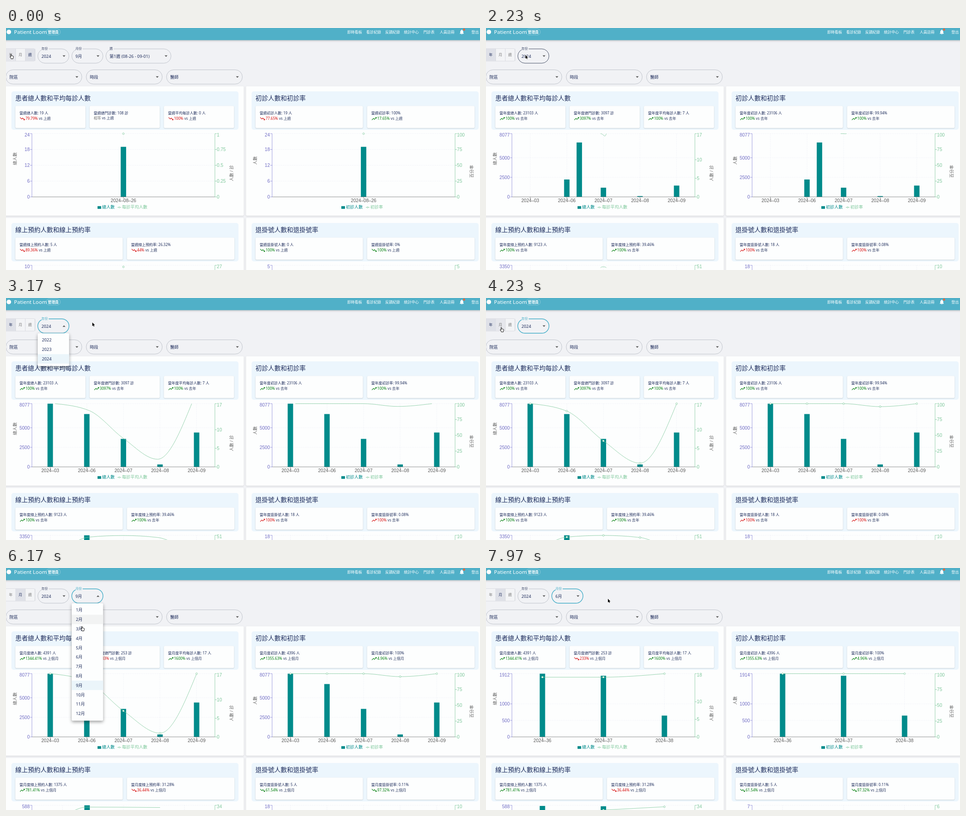
These frames come from a looping animation (1046 by 535 pixels, 8000 ms). An HTML page with a canvas:

```html
<!DOCTYPE html>
<html lang="zh-Hant">
<head>
<meta charset="utf-8">
<title>Clinic dashboard</title>
<style>
html, body { margin: 0; width: 100%; height: 100%; overflow: hidden; background: #f1f2f5; }
canvas { display: block; width: 1046px; height: 535px; }
</style>
</head>
<body>
<canvas id="stage"></canvas>
<script>
const W = 1046, H = 535, LOOP = 8000;
const canvas = document.getElementById('stage');
const g = canvas.getContext('2d');
const dpr = window.devicePixelRatio || 1;
canvas.width = W * dpr;
canvas.height = H * dpr;

const CJK = '"Noto Sans CJK TC", "Noto Sans CJK JP", "Noto Sans CJK", sans-serif';
const UI = '"Noto Sans", ' + CJK;
const AXIS = '"Liberation Sans", ' + CJK;
const BG = '#f1f2f5', NAVY = '#1f2d5c', TEAL = '#008b8b', GREEN = '#7cc79a', PURPLE = '#6f6bc4', FOCUS = '#45aec8';

// Times of clicks and of data arriving
const T = { year: 350, yearStats: 2130, yearMenu: [2420, 3450], month: 4480, monthMenu: [5450, 7020], monthStats: 6150 };

const PERIOD = { week: ['當週', '上週'], year: ['當年度', '去年'], month: ['當月度', '上個月'] };

// stats: [value, change in %]
const charts = [
  {
    x: 0, y: 0, title: '患者總人數和平均每診人數', labels: ['總人數', '總門診數', '平均每診人數'], units: [' 人', ' 診', ' 人'],
    stats: {
      week: [['19', -79.79], ['108', 0], ['0', -100]],
      year: [['23103', 100], ['3097', 3097], ['7', 100]],
      month: [['4391', 1344.41], ['253', -233], ['17', 1600]]
    },
    data: {
      week: { left: [0, 6, 12, 18, 24], right: [0, .25, .5, .75, 1], bars: [.792], line: [1] },
      year: { left: [0, 2500, 5000, 8077], right: [0, 5, 10, 17], bars: [1, .836, .443, .039, .5437], line: [1, 15 / 17, 7 / 17, 1 / 17, 1] },
      month: { left: [0, 500, 1000, 1912], right: [0, 5, 10, 18], bars: [1, .967, .337], line: [17 / 18, 17 / 18, 1] }
    },
    side: [['總人數', 20, 289], ['人數 / 診', 498, 321]], legend: [['總人數', 202], ['每診平均人數', 246]], arrive: [2145, 6225]
  },
  {
    x: 530, y: 0, title: '初診人數和初診率', labels: ['初診人數', '初診率'], units: [' 人', '%'],
    stats: {
      week: [['19', -77.65], ['100', 17.65]],
      year: [['23106', 100], ['99.94', 100]],
      month: [['4396', 1355.63], ['100', 4.96]]
    },
    data: {
      week: { left: [0, 6, 12, 18, 24], right: [0, 25, 50, 75, 100], bars: [.792], line: [1] },
      year: { left: [0, 2500, 5000, 8077], right: [0, 25, 50, 75, 100], bars: [1, .836, .443, .039, .5437], line: [1, 1, 1, .953, 1] },
      month: { left: [0, 500, 1000, 1914], right: [0, 25, 50, 75, 100], bars: [1, .967, .337], line: [1, 1, 1] }
    },
    side: [['人數', 20, 293], ['百分率', 498, 317]], legend: [['初診人數', 210], ['初診率', 264]], arrive: [2145, 6225]
  },
  {
    x: 0, y: 291, title: '線上預約人數和線上預約率', labels: ['線上預約人數', '線上預約率'], units: [' 人', '%'],
    stats: {
      week: [['5', -89.36], ['26.32', -44]],
      year: [['9123', 100], ['39.46', 100]],
      month: [['1375', 781.41], ['31.28', -36.44]]
    },
    data: {
      week: { left: [0, 10], right: [0, 27], bars: [.5], line: [.975] },
      year: { left: [0, 3350], right: [0, 51], bars: [.6, 1, .5, .04, .41], line: [.62, .972, .998, .965, .66] },
      month: { left: [0, 588], right: [0, 34], bars: [.99, .985, .35], line: [.88, .925, .977] }
    },
    side: [], legend: [], arrive: [2145, 6165]
  },
  {
    x: 530, y: 291, title: '退掛號人數和退掛號率', labels: ['退掛號人數', '退掛號率'], units: [' 人', '%'], inverse: true,
    stats: {
      week: [['0', -100], ['0', -100]],
      year: [['18', 100], ['0.08', 100]],
      month: [['5', -61.54], ['0.11', -97.32]]
    },
    data: {
      week: { left: [0, 5], right: [0, 5], bars: [0], line: [0] },
      year: { left: [0, 18], right: [0, 10], bars: [0, 0, 0, 0, 0], line: [0, 0, 0, 0, 0] },
      month: { left: [0, 7], right: [0, 6], bars: [0, 0, 0], line: [0, 0, 0] }
    },
    side: [], legend: [], arrive: [2145, 6225]
  }
];
const TICKS = {
  week: ['2024–08–26'],
  year: ['2024–03', '2024–06', '2024–07', '2024–08', '2024–09'],
  month: ['2024–36', '2024–37', '2024–38']
};

const clamp = v => Math.max(0, Math.min(1, v));
const mix = (a, b, k) => a + (b - a) * k;

// CSS "ease": cubic-bezier(.25, .1, .25, 1)
function ease(x) {
  if (x <= 0 || x >= 1) return clamp(x);
  let lo = 0, hi = 1;
  const bez = (s, a, b) => 3 * a * s * (1 - s) ** 2 + 3 * b * s * s * (1 - s) + s ** 3;
  for (let i = 0; i < 22; i++) {
    const m = (lo + hi) / 2;
    if (bez(m, .25, .25) < x) lo = m; else hi = m;
  }
  return bez(lo, .1, 1);
}

// y is the visual middle of the text
function text(s, x, y, size, color, align = 'left', font = UI, weight = 400) {
  g.font = `${weight} ${size}px ${font}`;
  g.fillStyle = color;
  g.textAlign = align;
  g.fillText(s, x, y + size * .37);
  return g.measureText(s).width;
}

function box(x, y, w, h, r, fill, stroke, lw = 1) {
  g.beginPath();
  g.roundRect(x, y, w, h, r);
  if (fill) { g.fillStyle = fill; g.fill(); }
  if (stroke) { g.strokeStyle = stroke; g.lineWidth = lw; g.stroke(); }
}

function raised(blur, dy, alpha, draw) {
  g.save();
  g.shadowColor = `rgba(0,0,0,${alpha})`;
  g.shadowBlur = blur * dpr;
  g.shadowOffsetY = dy * dpr;
  draw();
  g.restore();
}

function seg(x1, y1, x2, y2, color, lw = .8, dash = []) {
  g.strokeStyle = color;
  g.lineWidth = lw;
  g.setLineDash(dash);
  g.beginPath();
  g.moveTo(x1, y1);
  g.lineTo(x2, y2);
  g.stroke();
  g.setLineDash([]);
}

function ring(x, y, r = 1.9) {
  g.beginPath();
  g.arc(x, y, r, 0, Math.PI * 2);
  g.fillStyle = '#fff';
  g.fill();
  g.strokeStyle = GREEN;
  g.lineWidth = .8;
  g.stroke();
}

function triangle(x, y, up) {
  const d = up ? -1.6 : 1.6;
  g.fillStyle = '#555';
  g.beginPath();
  g.moveTo(x - 3.2, y - d);
  g.lineTo(x + 3.2, y - d);
  g.lineTo(x, y + d);
  g.fill();
}

// Monotone cubic through the points
function monotone(p) {
  const n = p.length, s = [], m = [];
  for (let i = 0; i < n - 1; i++) s.push((p[i + 1][1] - p[i][1]) / ((p[i + 1][0] - p[i][0]) || 1));
  for (let i = 1; i < n - 1; i++) {
    const h0 = p[i][0] - p[i - 1][0], h1 = p[i + 1][0] - p[i][0];
    const q = (s[i - 1] * h1 + s[i] * h0) / ((h0 + h1) || 1);
    m[i] = (Math.sign(s[i - 1]) + Math.sign(s[i])) * Math.min(Math.abs(s[i - 1]), Math.abs(s[i]), .5 * Math.abs(q));
  }
  m[0] = (3 * s[0] - m[1]) / 2;
  m[n - 1] = (3 * s[n - 2] - m[n - 2]) / 2;
  g.beginPath();
  g.moveTo(...p[0]);
  for (let i = 0; i < n - 1; i++) {
    const [x0, y0] = p[i], [x1, y1] = p[i + 1], d = (x1 - x0) / 3;
    g.bezierCurveTo(x0 + d, y0 + d * m[i], x1 - d, y1 - d * m[i + 1], x1, y1);
  }
  g.strokeStyle = GREEN;
  g.lineWidth = .8;
  g.stroke();
}

const L = 57.2, R = 461, TOP = 233.6, BOT = 373.4;
const slotX = (i, n) => L + (R - L) * (i + .5) / n;
const level = f => BOT - (BOT - TOP) * f;

function plot(c, t) {
  const [a, b] = c.arrive;
  const mode = t < a ? 'week' : t < b ? 'year' : 'month';
  const prev = mode === 'month' ? c.data.year : mode === 'year' ? c.data.week : null;
  const age = mode === 'month' ? t - b : mode === 'year' ? t - a : 1e5;
  const d = c.data[mode], n = d.bars.length;
  const maxL = d.left[d.left.length - 1], maxR = d.right[d.right.length - 1];

  for (const v of d.left) seg(L, level(v / maxL), R, level(v / maxL), '#e6e8f2', .6, [2, 2]);
  for (let i = 0; i < n; i++) seg(slotX(i, n), TOP, slotX(i, n), BOT, '#e6e8f2', .6, [2, 2]);

  const kb = ease(age / 400);
  g.fillStyle = TEAL;
  d.bars.forEach((f, i) => {
    let x = slotX(i, n), h = f * kb;
    if (prev && i < prev.bars.length) {
      x = mix(slotX(i, prev.bars.length), x, kb);
      h = mix(prev.bars[i], f, kb);
    } else if (!prev) h = f;
    g.fillRect(x - 6, level(h), 12, BOT - level(h));
  });

  seg(L, BOT, R, BOT, '#777');
  seg(L, TOP, L, BOT, '#8884d8');
  seg(R, TOP, R, BOT, GREEN);
  for (const v of d.left) {
    const y = level(v / maxL);
    seg(L - 4, y, L, y, '#8884d8');
    text(String(v), 52.3, Math.max(y, 236.3), 10.1, PURPLE, 'right', AXIS);
  }
  for (const v of d.right) {
    const y = level(v / maxR);
    seg(R, y, R + 4, y, GREEN);
    text(String(v), 465.3, Math.max(y, 236.3), 10.1, GREEN, 'left', AXIS);
  }
  TICKS[mode].forEach((s, i) => {
    seg(slotX(i, n), BOT, slotX(i, n), BOT + 4, '#777');
    text(s, slotX(i, n), 381, 10.1, '#5a5a5a', 'center', AXIS);
  });

  const kl = ease(age / 1500);
  const pts = d.line.map((f, i) => {
    const p = [slotX(i, n), level(f)];
    if (!prev) return p;
    const m = prev.line.length, j = Math.floor(i * m / n);
    return [mix(slotX(j, m), p[0], kl), mix(level(prev.line[j]), p[1], kl)];
  });
  if (n > 1) monotone(pts);
  if (kl >= 1) pts.forEach(p => ring(...p));

  for (const [s, x, y] of c.side) {
    g.save();
    g.translate(x, y);
    g.rotate(-Math.PI / 2);
    text(s, 0, 0, 9.3, '#666', 'center', AXIS);
    g.restore();
  }
  c.legend.forEach(([s, x], i) => {
    if (i) {
      seg(x, 396.5, x + 8, 396.5, GREEN);
      ring(x + 4, 396.5, 1.4);
    } else {
      g.fillStyle = TEAL;
      g.fillRect(x, 393.8, 8, 6);
    }
    text(s, x + 10, 396, 9.3, i ? GREEN : TEAL, 'left', AXIS, i ? 400 : 500);
  });
}

const UP = new Path2D('m16 6 2.29 2.29-4.88 4.88-4-4L2 16.59 3.41 18l6-6 4 4 6.3-6.29L22 12V6z');
const DOWN = new Path2D('m16 18 2.29-2.29-4.88-4.88-4 4L2 7.41 3.41 6l6 6 4-4 6.3 6.29L22 12v6z');

function icon(path, x, y, k, fill) {
  g.save();
  g.translate(x, y);
  g.scale(k, k);
  g.fillStyle = fill;
  g.fill(path);
  g.restore();
}

function panel(c, t) {
  const mode = t < T.yearStats ? 'week' : t < T.monthStats ? 'year' : 'month';
  g.save();
  g.translate(c.x, c.y);
  raised(2.5, .8, .16, () => box(c.x ? -.5 : -8, 128.8, c.x ? 540 : 532.8, 286.2, 2, '#fdfefe'));
  box(12, 140, 501, 85, 5, '#ecf6fd');
  text(c.title, 20.6, 155, 13.85, NAVY);
  const n = c.labels.length, cw = n === 3 ? 155 : 237.2, step = n === 3 ? 163.9 : 246.4;
  c.labels.forEach((label, i) => {
    const x = 20.5 + i * step, [value, change] = c.stats[mode][i];
    raised(2, .7, .2, () => box(x, 172.3, cw, 49, 3, '#fdfefe'));
    text(`${PERIOD[mode][0]}${label}: ${value}${c.units[i]}`, x + 9.2, 187.6, 8, NAVY);
    let end = x + 9.2;
    if (change) {
      const color = (change > 0) !== !!c.inverse ? '#007d0c' : '#d60c0c';
      icon(change > 0 ? UP : DOWN, x + 9, 194, .545, color);
      end = x + 22.4;
      end += text(Math.abs(change) + '%', end, 200.3, 8.1, color, 'left', UI, 500);
    } else end += text('相等', end, 199.3, 8, '#777');
    text(` vs ${PERIOD[mode][1]}`, end, change ? 200.3 : 199.3, 8.1, '#2d3a63');
  });
  plot(c, t);
  g.restore();
}

const BELL = new Path2D('M12 22c1.1 0 2-.9 2-2h-4c0 1.1.9 2 2 2zm6-6v-5c0-3.07-1.64-5.64-4.5-6.32V4a1.5 1.5 0 0 0-3 0v.68C7.63 5.36 6 7.92 6 11v5l-2 2v1h16v-1l-2-2z');

function dot(x, y, r, fill) {
  g.fillStyle = fill;
  g.beginPath();
  g.arc(x, y, r, 0, Math.PI * 2);
  g.fill();
}

function header() {
  raised(4, 1, .25, () => box(-5, -5, W + 10, 31.8, 0, '#50b0c8'));
  dot(6.3, 8.8, 5, '#fff');
  text('Patient Loom', 17.7, 8.9, 11.6, '#fff');
  box(88.5, 2, 31.5, 13.5, 6.75, null, 'rgba(255,255,255,.4)', .7);
  text('管理員', 104.3, 8.8, 7.8, '#fff', 'center', UI, 600);
  const nav = [['即時看板', 753], ['看診紀錄', 795], ['反饋紀錄', 836.7], ['統計中心', 878.3], ['門診表', 921], ['人員註冊', 957], ['登出', 1027]];
  for (const [s, x] of nav) text(s, x, 8.5, 8.2, '#fff', 'left', UI, 500);
  icon(BELL, 999.2, 2.2, .55, '#fff');
  dot(1010.8, 3.6, 2.3, '#f4602c');
}

function select(x, y, w, label, value, state = '') {
  const focus = state === 'focus' || state === 'open';
  const color = focus ? FOCUS : state === 'hover' ? '#1e2a44' : '#b3b8c0';
  box(x, y, w, 31.6, 15.8, null, color, focus ? 1.4 : .8);
  if (label) {
    g.fillStyle = BG;
    g.fillRect(x + 6.5, y - 2, label.length * 7 + 3.5, 4);
    text(label, x + 8, y - .3, 7, focus ? FOCUS : '#3a4566');
  }
  text(value, x + 8, y + 15.9, 9.3, NAVY);
  triangle(x + w - 11, y + 15.9, state === 'open');
}

function toggles(mode, hover) {
  box(-4, 45.6, 68, 27.6, 3, '#f3f4f6', '#d6d8dd', .8);
  ['year', 'month', 'week'].forEach((m, i) => {
    const x = i * 21.3, on = m === mode;
    if (on || hover === i) {
      g.fillStyle = on ? '#dfe1e8' : '#e6e7ec';
      g.fillRect(x, 46, 21.3, 26.8);
    }
    seg(x + 21.3, 46, x + 21.3, 73, '#d2d4da', .8);
    text('年月週'[i], x + 10.4, 59.4, 8, on ? NAVY : '#777', 'center', UI, 500);
  });
}

function menu(x, items, chosen, hover, [from, to], t) {
  const k = t < to ? ease((t - from) / 230) : 1 - clamp((t - to) / 150);
  if (t < from || k <= 0) return;
  const h = items.length * 20.8 + 10;
  g.save();
  g.globalAlpha = k;
  if (t < to) {
    g.translate(x + 34.5, 78);
    g.scale(mix(.75, 1, k), mix(.56, 1, k));
    g.translate(-x - 34.5, -78);
  }
  raised(7, 3, .38, () => box(x, 78, 69.3, h, 2.5, '#fdfefe'));
  items.forEach((s, i) => {
    const y = 82.6 + i * 20.8;
    if (i === chosen || i === hover) {
      g.fillStyle = i === chosen ? '#ebf5fa' : '#f2f3f3';
      g.fillRect(x, y, 69.3, 20.8);
    }
    text(s, x + 9.2, y + 10.4, 9.3, NAVY);
  });
  g.restore();
}

// [time, x, y, hand?]
const PATH = [
  [0, 11, 58, 1], [500, 11, 58, 1], [900, 24, 60, 1], [1250, 60, 61, 0], [1900, 84, 60, 0], [2230, 87, 59.5, 0], [2480, 88, 59, 0],
  [2950, 190.5, 54, 0], [3500, 190.5, 54, 0], [3950, 70, 68, 0], [4100, 44, 68, 1], [4230, 33.7, 65, 1], [4650, 32, 62, 1],
  [4850, 66, 62, 0], [5200, 176, 61, 1], [5600, 177, 62, 1], [5950, 171, 105, 1], [6170, 167.5, 129, 1],
  [6480, 171, 170, 1], [6700, 172.5, 191, 1], [7150, 173, 192, 1], [7300, 200, 150, 0], [7700, 269, 68, 0], [8000, 269, 68, 0]
];
function pointer(t) {
  let i = 0;
  while (i < PATH.length - 2 && PATH[i + 1][0] <= t) i++;
  const a = PATH[i], b = PATH[i + 1], k = clamp((t - a[0]) / (b[0] - a[0]));
  return { x: mix(a[1], b[1], k), y: mix(a[2], b[2], k), hand: a[3] };
}

const ARROW = new Path2D('M0 0V8.2L1.9 6.5L3.2 9.3L4.5 8.7L3.2 6H5.7Z');
const HAND = new Path2D('M-.8 .8Q-.8 0 0 0Q.8 0 .9 .8L1.3 3.6Q2 3 2.7 3.7Q3.5 3.3 4.1 4.1Q5.3 3.8 5.4 5Q5.6 7 4.6 8.6V10H0V8.9L-2.5 5.8Q-2.4 4.6-1.2 5.1L-.2 5.9Z');

function cursor(p) {
  g.save();
  g.translate(p.x, p.y);
  g.lineJoin = 'round';
  g.lineWidth = p.hand ? 1 : 1.4;
  g.strokeStyle = p.hand ? '#111' : '#fff';
  g.fillStyle = p.hand ? '#fff' : '#000';
  const shape = p.hand ? HAND : ARROW;
  if (p.hand) { g.fill(shape); g.stroke(shape); }
  else { g.stroke(shape); g.fill(shape); }
  g.restore();
}

const YEARS = ['2022', '2023', '2024'];
const MONTHS = Array.from({ length: 12 }, (_, i) => i + 1 + '月');
const within = (t, [a, b]) => t >= a && t < b;

function filters(t, p) {
  const mode = t < T.year ? 'week' : t < T.month ? 'year' : 'month';
  const overToggle = p.y > 45 && p.y < 73 && p.x < 64 ? Math.floor(p.x / 21.3) : -1;
  const over = x => p.x > x && p.x < x + 69 && p.y > 46 && p.y < 78 ? 'hover' : '';
  toggles(mode, overToggle);

  let ys = over(70), ms = over(145);
  if (within(t, T.yearMenu)) ys = 'open';
  else if (within(t, [T.yearMenu[1], T.month])) ys = 'focus';
  if (within(t, T.monthMenu)) ms = 'open';
  else if (t >= T.monthMenu[1]) ms = 'focus';
  select(70.2, 46.2, 68.8, '年份', '2024', ys);
  if (mode !== 'year') select(145.2, 46.2, 68.8, '月份', t < T.monthMenu[1] ? '9月' : '6月', ms);
  if (mode === 'week') select(220.4, 46.2, 143.8, '週', '第1週 (08-26 - 09-01)');
  select(-.4, 92.4, 167.8, '', '院區');
  select(177, 92.4, 167.8, '', '時段');
  select(354.2, 92.4, 167.4, '', '醫師');
}

function draw(t) {
  g.setTransform(dpr, 0, 0, dpr, 0, 0);
  g.fillStyle = BG;
  g.fillRect(0, 0, W, H);
  const p = pointer(t), late = pointer(Math.max(0, t - 80));
  for (const c of charts) panel(c, t);
  header();
  filters(t, p);
  const row = late.y > 82.6 ? Math.floor((late.y - 82.6) / 20.8) : -1;
  menu(70, YEARS, 2, -1, T.yearMenu, t);
  menu(145, MONTHS, 8, row, T.monthMenu, t);
  cursor(p);
}

const start = performance.now();
function frame() {
  draw((performance.now() - start) % LOOP);
  requestAnimationFrame(frame);
}
frame();
</script>
</body>
</html>
```
